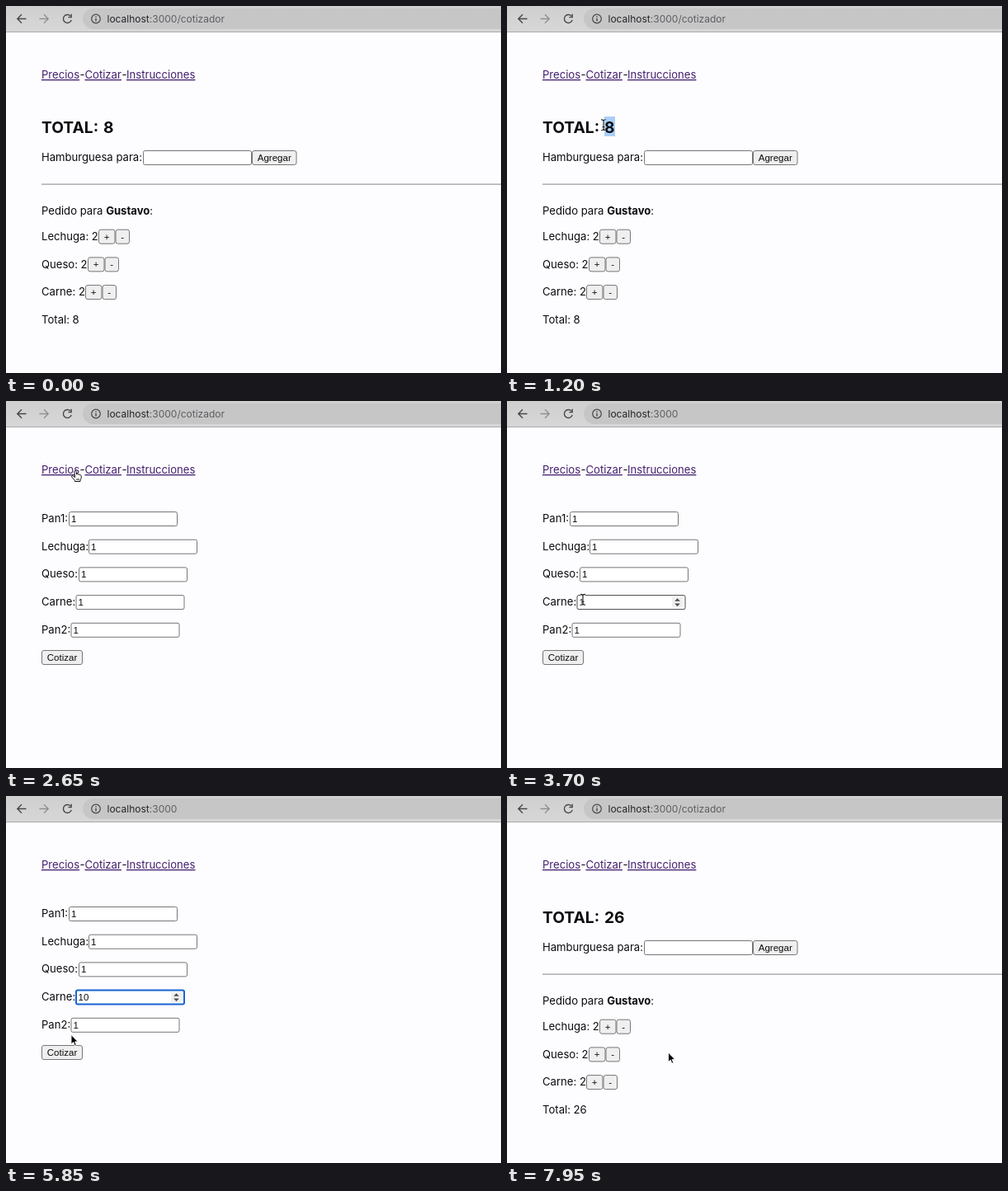
An HTML page that plays this animation: 600 by 445 pixels, repeating every 8 s.

```html
<!DOCTYPE html>
<html lang="es">
<head>
<meta charset="utf-8">
<title>Cotizador</title>
<style>
  html, body { margin: 0; width: 100%; height: 100%; overflow: hidden; background: #fdfcfe; }
  svg { display: block; width: 600px; height: 445px; }
  text { font: 13.1px Inter, "Open Sans", sans-serif; fill: #0c0c0e; white-space: pre; }
  .h2 { font-size: 19.2px; font-weight: 700; }
  .ui { font: 11.5px "Liberation Sans", Arial, sans-serif; }
  .url { font-size: 12px; fill: #5c5d60; }
  .link { fill: #43206f; text-decoration: underline; }
  .input { fill: #fff; stroke: #767676; }
  .button { fill: #efefef; stroke: #767676; }
  .icon { fill: none; stroke: #47484b; stroke-width: 1.4; }
</style>
</head>
<body>
<svg id="stage" viewBox="0 0 600 445"></svg>
<script>
const LOOP = 8000, STEP = 50;
const stage = document.getElementById('stage');

const label = (x, y, str, cls = '', id = '') =>
  `<text x="${x}" y="${y}" class="${cls}" id="${id}">${str}</text>`;
const box = (x, y, w, h, cls, r = 2, id = '') =>
  `<rect x="${x}" y="${y}" width="${w}" height="${h}" rx="${r}" class="${cls}" id="${id}"/>`;
const button = (x, y, w, str, textX, id) =>
  box(x + .5, y + .5, w - 1, 17, 'button', 2.5, id) + label(textX, y + 13, str, 'ui');

const rowY = i => 134 + i * 33.7;
const fields = [['Pan1:', 76], ['Lechuga:', 100], ['Queso:', 88], ['Carne:', 84.5], ['Pan2:', 78.5]]
  .map(([name, x], i) => ({ name, x, y: rowY(i) }));
const meat = fields[3];
const ingredients = [['Lechuga', 112], ['Queso', 99], ['Carne', 96]];

const toolbar = `
  <defs><linearGradient id="bar" x2="0" y2="1">
    <stop stop-color="#d0cfd0"/><stop offset="1" stop-color="#d8d7d8"/>
  </linearGradient></defs>
  <rect width="600" height="445" fill="#fdfcfe"/>
  <rect width="600" height="31" fill="url(#bar)"/>
  <rect x="93" y="3" width="540" height="25" rx="12.5" fill="#c7c6c7"/>
  <rect y="31" width="600" height="1" fill="#aaa9aa"/>
  <path class="icon" d="M24.5 15.5H14M19 10.3L13.8 15.5L19 20.7"/>
  <path class="icon" style="stroke:#919193" d="M40.5 15.5H51M46 10.3L51.2 15.5L46 20.7"/>
  <path class="icon" d="M78.2 12.2A5 5 0 1 0 79.2 17M79.2 9.8V13.6H75.4"/>
  <circle class="icon" cx="109" cy="15.5" r="5.3" style="stroke-width:1.2"/>
  <path class="icon" d="M109 14.8V18.4M109 12.3V13.6"/>
  <text x="122.5" y="20" class="url"><tspan fill="#242528">localhost</tspan>:3000<tspan id="path">/cotizador</tspan></text>`;

const nav = label(43, 88, 'Precios', 'link') + label(89.6, 88, '-') +
  label(95.5, 88, 'Cotizar', 'link') + label(140.4, 88, '-') +
  label(146, 88, 'Instrucciones', 'link');

const quotePage = `<g id="quote">
  <rect id="selection" x="118" y="134" width="13" height="24" fill="#a8cffa"/>
  ${label(43, 153.5, 'TOTAL:', 'h2')}${label(118, 153.5, '8', 'h2', 'heading')}
  ${label(43, 188, 'Hamburguesa para:')}
  ${box(166.5, 175.5, 131, 17, 'input')}
  ${button(298, 175, 54.5, 'Agregar', 304.8)}
  <rect x="43" y="215.6" width="557" height="1" fill="#858587"/>
  <text x="43" y="252.5">Pedido para <tspan font-weight="700">Gustavo</tspan>:</text>
  ${ingredients.map(([name, x], i) => {
    const y = 270.7 + i * 33.7;
    return label(43, y + 13.3, name + ': 2') +
      button(x, y, 20.5, '+', x + 6.8) + button(x + 20.5, y, 17.5, '-', x + 27.3);
  }).join('')}
  ${label(43, 384.8, 'Total: 8', '', 'total')}
</g>`;

const formPage = `<g id="form">
  ${fields.map((f, i) => label(43, f.y + 13, f.name) +
    box(f.x + .5, f.y + .5, 131, 17, 'input', 2, 'field' + i) +
    label(f.x + 3, f.y + 13, '1', 'ui', 'value' + i)).join('')}
  ${button(43, 302, 50, 'Cotizar', 49.8, 'submit')}
  <g id="spinner"><rect x="200" y="-6.5" width="13" height="13" rx="1" fill="#efefef"/>
    <path d="M203.2 -1.3L206.5 -4.8L209.8 -1.3ZM203.2 1.3L206.5 4.8L209.8 1.3Z" fill="#4b4b4b"/></g>
  <rect id="caret" y="${meat.y + 3}" width="1" height="12" fill="#111"/>
</g>`;

const beam = 'M-3 -6.5Q0 -6.5 0 -4.8Q0 -6.5 3 -6.5M0 -5V5M-3 6.5Q0 6.5 0 4.8Q0 6.5 3 6.5M-1.5 2.5H1.5';
const cursors = `<g id="cursor">
  <path id="arrow" d="M0 0V11.6L2.7 9.1L4.4 13.2L6.3 12.4L4.6 8.4H8.2Z" fill="#000" stroke="#fff" stroke-width=".9"/>
  <g id="beam" fill="none"><path d="${beam}" stroke="#fff" stroke-width="2.4" opacity=".8"/>
    <path d="${beam}" stroke="#111" stroke-width="1.1"/></g>
  <path id="hand" d="M-1.2 .6C-1 -.9 1 -.9 1.1 .5L1.6 4C2.2 3 3.6 3.2 3.8 4.3C4.5 3.6 5.6 4 5.8 5C6.8 4.6 7.4 5.4 7.3 6.6C7.2 9 6.8 9.6 6 11V12.5H-.6V11.3C-2 9.8 -3 8.3 -4.4 7C-5 6 -3.8 5.2 -2.8 6L-.4 7.6ZM2 9V11M4 9V11"
    fill="#fff" stroke="#111" stroke-width="1"/>
</g>`;

stage.innerHTML = toolbar + nav + quotePage + formPage + cursors;
const el = id => document.getElementById(id);
const show = (id, on) => { el(id).style.display = on ? '' : 'none'; };

// Pointer rests and turning points: [time, x, y]
const track = [
  [50, 461, 154], [800, 131, 146], [900, 130, 146], [1150, 117, 144.3],
  [1750, 117, 144.3], [2250, 84, 85], [2700, 84, 85], [3300, 72, 165],
  [3650, 92, 240.8], [5500, 92, 240.8], [5850, 79, 289.5], [6050, 68, 310],
  [6800, 68, 310], [7000, 255, 302], [7700, 255, 302], [7950, 195.5, 311]
];

function pointerAt(t) {
  const next = track.findIndex(k => k[0] > t);
  if (next === -1) return track[track.length - 1].slice(1);
  if (next === 0) return track[0].slice(1);
  const [t0, x0, y0] = track[next - 1], [t1, x1, y1] = track[next];
  const u = (t - t0) / (t1 - t0), e = u * u * (3 - 2 * u);
  return [x0 + (x1 - x0) * e, y0 + (y1 - y0) * e];
}

const within = (x, y, left, top, right, bottom) =>
  x >= left && x <= right && y >= top && y <= bottom;

function cursorKind(x, y, onForm) {
  if (within(x, y, 43, 76, 230, 92)) return 'hand';
  const overText = onForm
    ? fields.some(f => within(x, y, 43, f.y, f.x + 132, f.y + 18))
    : within(x, y, 43, 134, 133, 158) ||
      ingredients.some(([, right], i) => within(x, y, 43, 270 + i * 33.7, right, 289 + i * 33.7));
  return overText ? 'beam' : 'arrow';
}

function render(t) {
  const onForm = t >= 2600 && t < 6250;
  const total = t < 6250 ? '8' : '26';
  const [x, y] = pointerAt(t);
  const pointerShown = t >= 50 && !(t >= 4900 && t < 5550);

  show('quote', !onForm);
  show('form', onForm);
  show('path', t < 2700 || t >= 6250);
  el('heading').textContent = total;
  el('total').textContent = 'Total: ' + total;
  show('selection', t >= 900 && t < 1750 && x < 124);

  const focused = t >= 4100 && t < 6250, typed = t >= 4900;
  const hovered = fields.findIndex(f => within(x, y, f.x, f.y, f.x + 132, f.y + 18));
  fields.forEach((f, i) => {
    const ring = focused && f === meat;
    el('field' + i).style.stroke = ring ? '#1565d2' : i === hovered ? '#484848' : '';
    el('field' + i).style.strokeWidth = ring ? 2 : 1;
  });
  el('value3').textContent = typed ? '10' : '1';
  const active = focused ? 3 : hovered;
  show('spinner', active >= 0);
  if (active >= 0) {
    const f = fields[active];
    el('spinner').setAttribute('transform', `translate(${f.x - meat.x} ${f.y + 9})`);
  }
  el('caret').setAttribute('x', typed ? 100.4 : 94);
  show('caret', focused && (t < 4600 || (typed && t < 5550) || t >= 6050));
  const overSubmit = pointerShown && within(x, y, 43, 302, 93, 320);
  el('submit').style.fill = overSubmit ? '#e5e5e5' : '';
  el('submit').style.stroke = overSubmit ? '#4f4f4f' : '';

  const kind = cursorKind(x, y, onForm);
  show('cursor', pointerShown);
  for (const k of ['arrow', 'beam', 'hand']) show(k, k === kind);
  el('cursor').setAttribute('transform', `translate(${x} ${y})`);
}

const start = performance.now();
function tick() {
  const t = (performance.now() - start) % LOOP;
  render(Math.floor(t / STEP) * STEP);
  requestAnimationFrame(tick);
}
tick();
</script>
</body>
</html>
```
